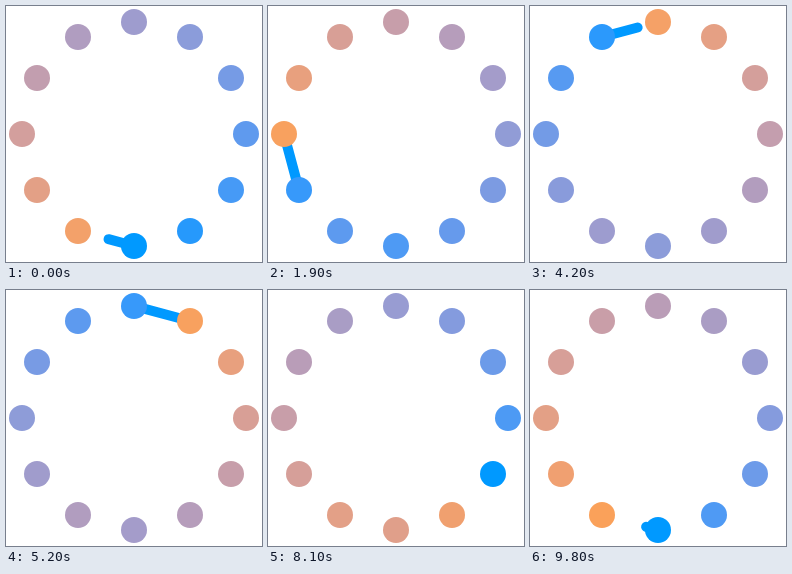
Write an HTML page with a canvas that moves like this. It is 256 by 256 pixels and loops after 9.9 s.

```html
<!DOCTYPE html>
<html lang="en">
<head>
<meta charset="utf-8">
<title>Dot ring</title>
<style>
  html, body { margin: 0; width: 100%; height: 100%; overflow: hidden; background: #fff; }
  canvas { display: block; width: 256px; height: 256px; }
</style>
</head>
<body>
<canvas id="stage" width="256" height="256"></canvas>
<script>
const ctx = document.getElementById('stage').getContext('2d');
const COUNT = 12, LOOP = 9900, HOP = LOOP / COUNT, TICK = 100;
const LEAD = 187.5;            // the loop opens partway into the first hop
const FADE = HOP * 11;
const BLUE = [0, 153, 255], ORANGE = [250, 161, 90];

// Dots run clockwise from the bottom.
function dotAt(i) {
  const a = i * 2 * Math.PI / COUNT;
  return [128 - 112 * Math.sin(a), 128 + 112 * Math.cos(a)];
}

const lerp = (a, b, u) => a + (b - a) * u;

// Blend in squared (roughly linear-light) space.
function mix(u) {
  const c = BLUE.map((v, i) => Math.round(Math.sqrt(lerp(v * v, ORANGE[i] ** 2, u))));
  return `rgb(${c})`;
}

// 0 = just reached (blue), 1 = fully faded (orange).
function fade(i, t) {
  const age = t - (i * HOP - LEAD);
  if (age >= 0) {
    const u = age / FADE;
    return u < 0.024 ? 0 : Math.min(1, u);
  }
  // Not reached yet in this loop: follow the opening gradient.
  const near = (COUNT - i + t / HOP) / COUNT;
  const u = 1.08 * near ** 1.4 - 0.01;
  return near < 0.015 ? 0 : Math.min(1, Math.max(0.016, u));
}

function drawLine(t) {
  const q = (t + LEAD) / HOP, k = Math.floor(q), f = q - k;
  const [x0, y0] = dotAt(k), [x1, y1] = dotAt(k + 1);
  const tail = Math.max(0, 2 * f - 1), head = Math.min(1, 2 * f);
  ctx.beginPath();
  ctx.moveTo(lerp(x0, x1, tail), lerp(y0, y1, tail));
  ctx.lineTo(lerp(x0, x1, head), lerp(y0, y1, head));
  ctx.stroke();
}

function draw(t) {
  ctx.fillStyle = '#fff';
  ctx.fillRect(0, 0, 256, 256);
  ctx.strokeStyle = mix(0);
  ctx.lineWidth = 10;
  ctx.lineCap = 'round';
  drawLine(t);
  for (let i = 1; i <= COUNT; i++) {
    const [x, y] = dotAt(i);
    ctx.fillStyle = mix(fade(i, t));
    ctx.beginPath();
    ctx.arc(x, y, 13, 0, 2 * Math.PI);
    ctx.fill();
  }
}

const start = performance.now();
function tick() {
  const t = Math.max(0, performance.now() - start) % LOOP;
  draw(Math.floor(t / TICK) * TICK);
  requestAnimationFrame(tick);
}
tick();
</script>
</body>
</html>
```
